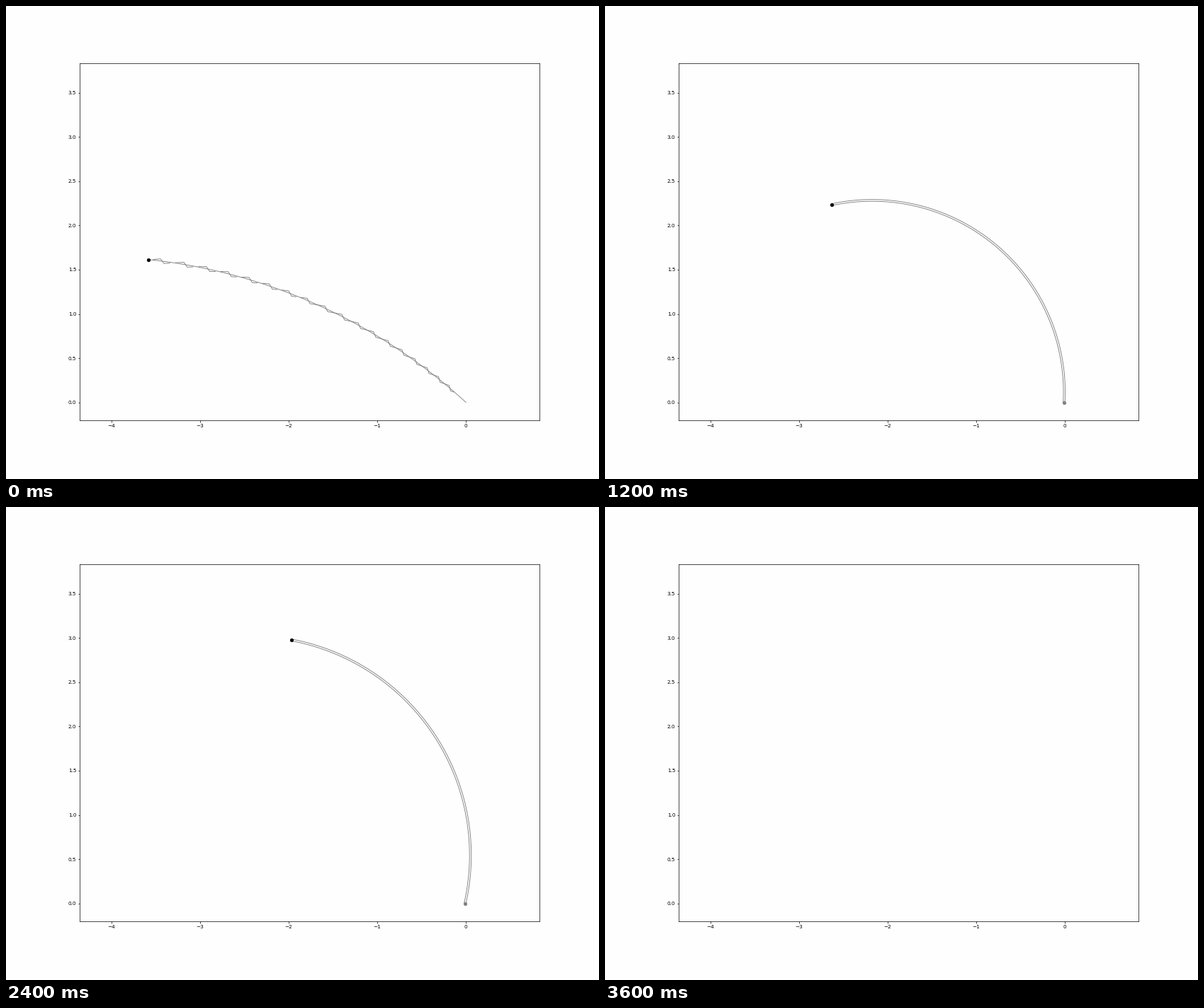
A matplotlib script that plays this animation: 837 by 669 pixels, repeating every 5.24 s.

```python
import numpy as np
import matplotlib.pyplot as plt
from matplotlib.animation import FuncAnimation

W, H, DPI = 837, 669, 64
PT = 72 / DPI              # points per pixel
LENGTH = 4.0
HALF_WIDTH = 0.01
LAST = 36                  # the step at which the rod is gone
PAPER, GRAY = "#fefefe", "#808080"

# The tip follows a cubic through four key points.
KEY_STEPS = [0, 4, 17, 28]
tip_x = np.poly1d(np.polyfit(KEY_STEPS, [-3.585, -3.221, -2.331, -1.779], 3))
tip_y = np.poly1d(np.polyfit(KEY_STEPS, [1.615, 1.800, 2.538, 3.230], 3))

half_angles = np.linspace(0.001, 1.5, 800)
chord_ratios = np.sinc(half_angles / np.pi)


def bend(base, tip, length):
    """Centre, radius and angles of the arc of given length from base to tip."""
    chord = tip - base
    dist = np.hypot(*chord)
    half = np.interp(-dist / length, -chord_ratios, half_angles)
    radius = dist / (2 * np.sin(half))
    normal = np.array([-chord[1], chord[0]]) / dist
    centre = (base + tip) / 2 + normal * radius * np.cos(half)
    facing = np.arctan2(-normal[1], -normal[0])
    return centre, radius, np.linspace(facing - half, facing + half, 120)


def ragged(xs, ys):
    """Sawtooth around a curve, denser to the right and broken on the left."""
    k = np.arange(-0.3, 17.5, 0.05)
    x = -3.445 + 0.268 * k - 0.0045 * k**2
    saw = np.interp(k % 1, [0, 0.15, 1], [1, -1, 1])
    y = np.interp(x, xs[::-1], ys[::-1]) + 0.024 * saw
    y[(k < 6.6) & (k % 1 > 0.42) & (k % 1 < 0.64)] = np.nan
    return x, y


fig = plt.figure(figsize=(W / DPI, H / DPI), dpi=DPI, facecolor=PAPER)
ax = fig.add_axes([104.4 / W, 83.4 / H, 649 / W, 505 / H], facecolor=PAPER)
ax.set_xlim(-4.353, 0.833)
ax.set_ylim(-0.2, 3.8375)
ax.set_xticks(range(-4, 1))
ax.set_yticks(np.arange(0, 3.6, 0.5))
ax.tick_params(labelsize=7.25 * PT, length=2.5 * PT, pad=2.6 * PT, width=0.7 * PT)
for spine in ax.spines.values():
    spine.set_linewidth(0.7 * PT)

outer, = ax.plot([], [], color=GRAY, lw=0.9 * PT)
inner, = ax.plot([], [], color=GRAY, lw=0.9 * PT)
dot = dict(marker="o", ls="", ms=4.5 * PT, mew=0.72 * PT)
foot, = ax.plot([-0.008], [-0.004], color=GRAY, **dot)
head, = ax.plot([], [], color="black", **dot)
parts = [outer, inner, foot, head]


def draw(frame):
    step = min(frame // 5, LAST)
    for part in parts:
        part.set_visible(step < LAST)
    if step == LAST:
        return parts

    # The rod starts as a single line and opens into a tube.
    gap = HALF_WIDTH if step else 0.0
    tip = np.array([tip_x(step), tip_y(step)])
    centre, radius, angles = bend(np.array([-gap, 0]), tip, LENGTH - 2 * gap)

    def edge(offset):
        r = radius + offset
        return centre[0] + r * np.cos(angles), centre[1] + r * np.sin(angles)

    outer.set_data(*edge(gap))
    inner.set_data(*(edge(-gap) if step else ragged(*edge(0))))
    foot.set_visible(step > 0)
    head.set_data([tip[0]], [tip[1]])
    return parts


anim = FuncAnimation(fig, draw, frames=262, interval=20, repeat=True,
                     repeat_delay=0, blit=False)
plt.show()
```
